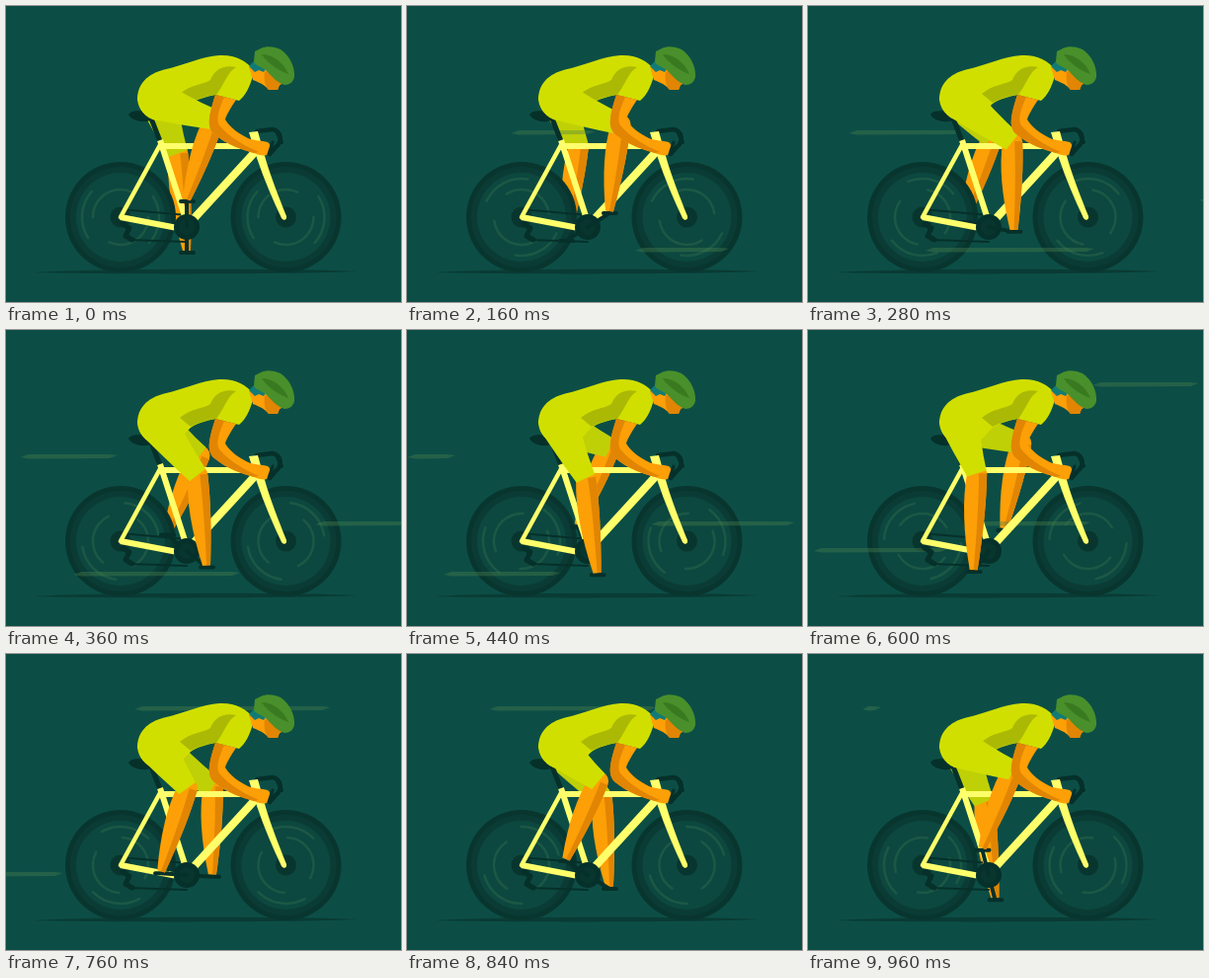
Recreate the animation shown at these times as an HTML page with a canvas. Size 400 by 300 pixels, loop 1000 ms.

```html
<!DOCTYPE html>
<html lang="en">
<head>
<meta charset="utf-8">
<title>Cyclist</title>
<style>
html, body { margin: 0; width: 100%; height: 100%; overflow: hidden; background: #0c4e46; }
canvas { display: block; width: 400px; height: 300px; }
</style>
</head>
<body>
<canvas id="stage" width="400" height="300"></canvas>
<script>
const ctx = document.getElementById('stage').getContext('2d');
const LOOP = 1000, STEP = 40, TAU = Math.PI * 2, RAD = Math.PI / 180;
const C = {
  bg: '#0c4e46', ground: '#093b34', tyre: '#08362f', rim: '#0a3c35', disc: '#0c483f',
  arc: '#1c5845', dark: '#06302a', streak: 'rgba(78,128,78,.38)',
  frame: '#ffff6b', lime: '#d0df00', limeFar: '#c0d006', limeShade: '#abb905',
  skin: '#fd9f06', skinShade: '#e18503', helmet: '#498f2b', stripe: '#397a20', hair: '#127b76'
};
const BB = [183, 224], CRANK = 26, HIP = [155, 96];
const STREAK_MS = 450;

const STREAKS = [
  { y: 128, start: 40, from: 198, to: -2 },
  { y: 247, start: 80, from: 330, to: 25 },
  { y: 196, start: 260, from: 420, to: 150 },
  { y: 223, start: 500, from: 150, to: -215 },
  { y: 55, start: 520, from: 400, to: 55 }
];

function fill(color, d) {
  ctx.fillStyle = color;
  ctx.fill(new Path2D(d));
}

function line(color, width, d, cap = 'butt') {
  ctx.strokeStyle = color;
  ctx.lineWidth = width;
  ctx.lineCap = cap;
  ctx.lineJoin = 'round';
  ctx.stroke(new Path2D(d));
}

function disc(x, y, r, color) {
  ctx.fillStyle = color;
  ctx.beginPath();
  ctx.arc(x, y, r, 0, TAU);
  ctx.fill();
}

const mix = (a, b, k) => a + (b - a) * k;

// Maps (along, across) of the segment a-b to the stage; positive across lies behind a leg
function along(a, b) {
  const dx = b[0] - a[0], dy = b[1] - a[1], len = Math.hypot(dx, dy);
  return (k, s) => [a[0] + dx * k - dy / len * s, a[1] + dy * k + dx / len * s];
}

// Closed outline through points, rounded between the first and the last
function limb(color, at, front, back) {
  ctx.fillStyle = color;
  ctx.beginPath();
  ctx.moveTo(...at(0, front[0]));
  ctx.quadraticCurveTo(...at(0.4, front[1]), ...at(1, front[2]));
  ctx.lineTo(...at(1, back[2]));
  ctx.quadraticCurveTo(...at(0.4, back[1]), ...at(0, back[0]));
  ctx.fill();
}

function pedalAt(turn) {
  const a = turn * TAU;
  return [BB[0] + CRANK * Math.sin(a), BB[1] - CRANK * Math.cos(a)];
}

// The thigh swings about the hip and looks longer while the leg pushes down
function kneeAt(turn) {
  const angle = RAD * (44.5 + 28 * Math.cos((turn - 0.565) * TAU));
  const reach = 58 + 9 * Math.cos((turn - 0.23) * TAU);
  return [HIP[0] + reach * Math.cos(angle), HIP[1] + reach * Math.sin(angle)];
}

function wheel(x, y, turn) {
  disc(x, y, 56, C.tyre);
  disc(x, y, 51, C.rim);
  disc(x, y, 45, C.disc);
  ctx.strokeStyle = C.arc;
  ctx.lineWidth = 2.5;
  ctx.lineCap = 'round';
  for (let i = 0; i < 4; i++) {
    const a = turn * TAU + i * TAU / 4 + (i % 2);
    ctx.beginPath();
    ctx.arc(x, y, i % 2 ? 39 : 28, a, a + (i % 2 ? 1.3 : 2));
    ctx.stroke();
  }
  disc(x, y, 10.5, C.tyre);
}

function streak({ y, start, from, to }, ms) {
  const p = (ms - start) / STREAK_MS;
  if (p <= 0 || p >= 1) return;
  const head = mix(from, to, 1 - (1 - p) ** 2), tail = mix(from, to, p ** 2.5);
  const tip = Math.min(8, (tail - head) / 3);
  fill(C.streak, `M${head} ${y + 1}L${head + tip} ${y - 2}L${tail - tip} ${y - 2}` +
    `L${tail} ${y - 1}L${tail - tip} ${y + 2}L${head + tip} ${y + 2.5}Z`);
}

function crank(turn) {
  const [x, y] = pedalAt(turn);
  line(C.dark, 4, `M${BB}L${x} ${y}M${x - 6} ${y}h13`, 'round');
}

function leg(turn, shorts) {
  const knee = kneeAt(turn), foot = pedalAt(turn);
  foot[1] -= 2;
  const calf = along(knee, foot), thigh = along(HIP, knee);
  disc(knee[0], knee[1], 10, C.skin);
  limb(C.skin, calf, [-10, -11, -4], [10, 16, 4]);
  limb(C.skinShade, calf, [-10, -11, -4], [-2, -3, 0]);
  disc(HIP[0], HIP[1], 20, shorts);
  limb(shorts, thigh, [-20, -13, -10], [20, 17, 10.5]);
}

function bike() {
  fill(C.dark, 'M124 110C127 105 136 106 142 107L156 109C158 113 152 115 146 116C138 119 127 116 124 110Z');
  line(C.dark, 5, 'M147 114L156 137');
  line(C.dark, 4.5, 'M254 127L270 125C278 127 281 137 273 143L267 150', 'round');
  line(C.dark, 4, 'M275 129L279 138', 'round');
  line(C.dark, 2, 'M116 206L183 212M124 237L183 239', 'round');
  line(C.dark, 5, 'M118 221L125 225L121 233L128 237', 'round');
  line(C.frame, 4.5, 'M157 139L116 214', 'round');
  line(C.frame, 6, 'M116 214L171 224.5M156 136L181 213M156 142L252 142');
  line(C.frame, 8, 'M253 147L187 219');
  fill(C.frame, 'M246 128L255 127L262 152C267 170 276 193 284 213C285 217 281 218 279 215C270 196 261 175 254 154Z');
}

function torso() {
  fill(C.lime, 'M133 95C133 79 143 69 160 64.5C180 60 199 51 216 50C231 49 243 55 250 64L250 70C247 83 242 91 236 96L212 90C203 92 194 94 187 99C180 105 178 112 168 114C152 117 136 114 133 95Z');
  fill(C.limeShade, 'M176 89C188 79 199 80 207 75C211 64 221 59 233 62C224 67 222 78 213 90C203 91 194 94 187 98C183 95 180 92 176 89Z');
}

function head() {
  fill(C.skin, 'M246 62L262 56L277 70L281 78L277 80L275 85L266 85C262 80 258 78 250 75Z');
  fill(C.skinShade, 'M262 66L277 70L281 78L277 80L275 85L266 85C262 81 261 74 262 66Z');
  fill(C.hair, 'M246 61L253 54L265 60L261 67L256 65L252 67Z');
  fill(C.helmet, 'M251 56L252 46L258 43C264 40 272 41 278 44C287 50 293 62 292 72C291 77 287 80 282 80C275 78 270 72 263 65C258 61 251 60 251 56Z');
  fill(C.stripe, 'M259 49C270 49 281 57 286 69C278 66 266 60 259 49Z');
}

function arm() {
  fill(C.skin, 'M212 90L233 95C227 104 223 111 222 115C227 123 235 129 245 134C252 137 259 136 265 138C269 141 269 147 265 150C262 153 256 151 251 149C240 146 224 141 211 130C203 123 205 112 212 90Z');
  fill(C.skinShade, 'M212 90L221 92C216 104 212 114 216 121C226 133 242 142 256 148L251 149C240 146 224 141 211 130C203 123 205 112 212 90Z');
  line(C.dark, 3, 'M270 138L266 150', 'round');
}

function draw(ms) {
  const turn = ms / LOOP;
  ctx.fillStyle = C.bg;
  ctx.fillRect(0, 0, 400, 300);
  fill(C.ground, 'M28 270C90 266 295 266 357 269C295 272 90 272 28 270Z');
  leg(turn + 0.5, C.limeFar);
  wheel(116, 214, turn);
  wheel(283.5, 214, turn);
  STREAKS.forEach(s => streak(s, ms));
  crank(turn + 0.5);
  bike();
  disc(...BB, 13, C.dark);
  disc(...BB, 8, C.tyre);
  crank(turn);
  torso();
  leg(turn, C.lime);
  head();
  arm();
}

function tick() {
  const ms = performance.now() % LOOP;
  draw(Math.floor(ms / STEP) * STEP);
  requestAnimationFrame(tick);
}
tick();
</script>
</body>
</html>
```
